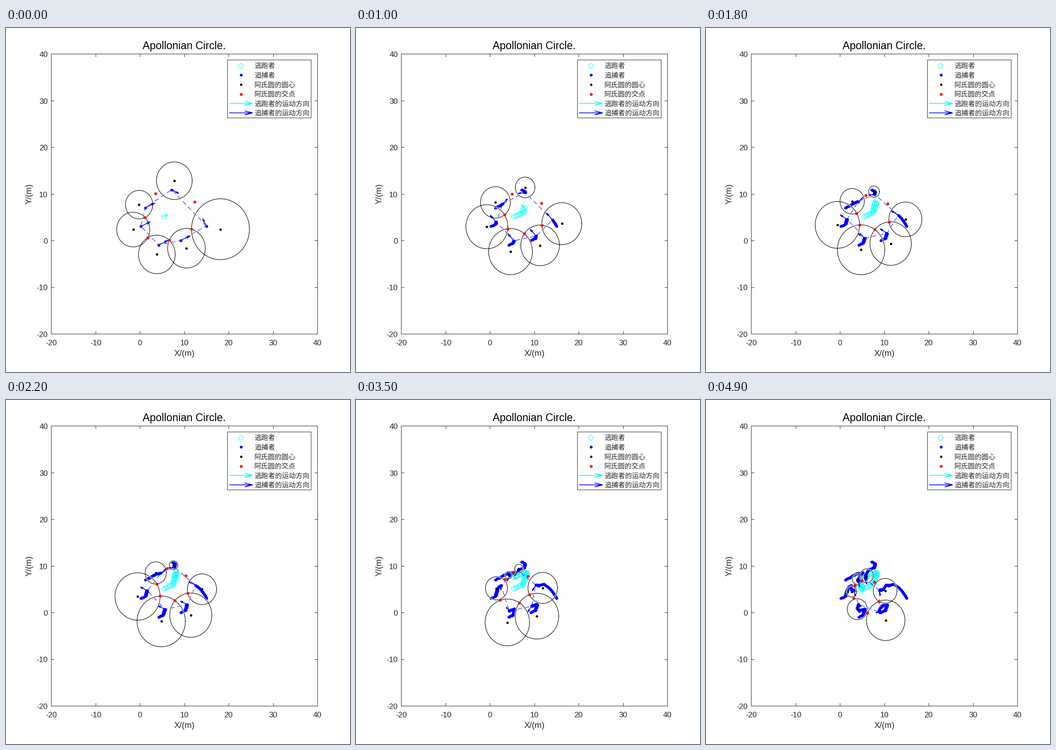
A matplotlib script for the animation above (5000 ms loop, 748 by 748 pixels).

```python
import numpy as np
import matplotlib.pyplot as plt
from matplotlib.animation import FuncAnimation
from matplotlib.patches import Rectangle

plt.rcParams["path.snap"] = False  # coordinates already sit on pixel centres

SIZE, DPI = 748, 64
PT = 72 / DPI                      # points per pixel
FRAMES, INTERVAL = 50, 100
EVADER_STEP, PURSUER_STEP = 0.4, 0.2
RATIO = PURSUER_STEP / EVADER_STEP
GUARD_PACE = 0.75                  # guards of the chosen gap move slower
INK = "#262626"
LEFT, RIGHT, TOP, BOTTOM = 98.5, 677.5, 56.5, 665.5

EVADER = np.array([5.0, 5.0])
PURSUERS = np.array([(15, 3), (7, 11), (1, 7), (0, 3), (4, -1), (9, 0)], float)


def length(v):
    return np.linalg.norm(v, axis=-1)


def plan(e, p):
    """Apollonian circles, their meeting points and the next moves."""
    centers = e + (p - e) / (1 - RATIO**2)
    radii = RATIO * length(p - e) / (1 - RATIO**2)
    next_radii = np.roll(radii, -1)
    span = np.roll(centers, -1, axis=0) - centers
    d = length(span)
    unit = span / d[:, None]
    along = (d**2 + radii**2 - next_radii**2) / (2 * d)
    apart = along**2 - radii**2    # positive where neighbours do not touch
    foot = centers + unit * along[:, None]
    side = np.column_stack([-unit[:, 1], unit[:, 0]])
    side *= np.sqrt(np.maximum(-apart, 0))[:, None]
    a, b = foot + side, foot - side
    meets = np.where((length(a - e) < length(b - e))[:, None], a, b)

    # Flee through the farthest gap; its two guards close in on it.
    reach = length(meets - e)
    gap = int(np.argmax(np.where(apart > 0, reach, -1)))
    heading = (meets[gap] - e) / reach[gap]
    moves = np.tile(heading, (len(p), 1))
    for i in (gap, (gap + 1) % len(p)):
        aim = meets[gap] - p[i]
        moves[i] = GUARD_PACE * aim / length(aim)
    return centers, radii, meets, heading, moves


def simulate():
    e, p = EVADER, PURSUERS
    states = []
    for _ in range(FRAMES):
        heading, moves = plan(e, p)[3:]
        e = e + EVADER_STEP * heading
        p = p + PURSUER_STEP * moves
        states.append((e, p, *plan(e, p)))
    return states


def to_px(points):
    points = np.asarray(points, float)
    x = LEFT + (points[..., 0] + 20) * (RIGHT - LEFT) / 60
    y = TOP + (40 - points[..., 1]) * (BOTTOM - TOP) / 60
    return np.stack([x, y], axis=-1)


def arrow_path(start, vec):
    tip = start + vec
    across = 0.25 * np.array([vec[1], -vec[0]])
    return np.array([start, tip, tip - 0.33 * (vec + across), tip,
                     tip - 0.33 * (vec - across), (np.nan, np.nan)])


def ring_path(center, radius):
    t = np.linspace(0, 2 * np.pi, 121)
    ring = center + radius * np.column_stack([np.cos(t), np.sin(t)])
    return np.vstack([ring, (np.nan, np.nan)])


fig = plt.figure(figsize=(SIZE / DPI, SIZE / DPI), dpi=DPI, facecolor="white")
ax = fig.add_axes([0, 0, 1, 1])
ax.set_xlim(0, SIZE)
ax.set_ylim(SIZE, 0)
ax.axis("off")


def label(x, y, text, px, ha="center", va="center", **kw):
    kw = {"family": "Liberation Sans", "color": INK, **kw}
    ax.text(x, y, text, fontsize=px * PT, ha=ha, va=va, **kw)


def stroke(color, width=1.0, z=3, xs=(), ys=(), **kw):
    return ax.plot(xs, ys, color=color, lw=width * PT, zorder=z,
                   solid_joinstyle="miter", **kw)[0]


def dots(color, px, z, xs=(), ys=()):
    return ax.plot(xs, ys, "o", color=color, ms=px * PT, mew=0, zorder=z)[0]


def open_dots(px, z, xs=(), ys=()):
    return ax.plot(xs, ys, "o", mfc="none", mec="cyan", ms=px * PT,
                   mew=PT, zorder=z)[0]


def frame_box(x0, y0, x1, y1, z, face="none"):
    ax.add_patch(Rectangle((x0, y0), x1 - x0, y1 - y0, fc=face, ec=INK,
                           lw=PT, zorder=z))


def draw_axes():
    frame_box(LEFT, TOP, RIGHT, BOTTOM, 2)
    for v in range(-20, 41, 10):
        x, y = np.floor(to_px((v, v))) + 0.5
        for edge, step in ((TOP, 6), (BOTTOM, -6)):
            stroke(INK, 1, 2, [x, x], [edge, edge + step])
        for edge, step in ((LEFT, 6), (RIGHT, -6)):
            stroke(INK, 1, 2, [edge, edge + step], [y, y])
        label(x - 0.5, 690, str(v), 16.7, va="baseline")
        label(91, y + 6, str(v), 16.7, ha="right", va="baseline")
    label(388, 713, "X/(m)", 18.3, va="baseline")
    label(51, 360.5, "Y/(m)", 18.3, rotation=90)
    label(387.5, 46, "Apollonian Circle.", 23.3, va="baseline", color="black")


def draw_legend():
    frame_box(481.5, 69.5, 663.5, 195.5, 10, "white")
    names = ("逃跑者", "追捕者", "阿氏圆的圆心", "阿氏圆的交点",
             "逃跑者的运动方向", "追捕者的运动方向")
    rows = 81.8 + 20.6 * np.arange(6)
    for y, name in zip(rows, names):
        label(540, y + 5.4, name, 15, ha="left", va="baseline",
              family="Noto Sans CJK JP", weight="light", zorder=11)
    open_dots(10, 11, [510.5], [rows[0]])
    for y, color, px in zip(rows[1:4], ("blue", "black", "red"), (6.2, 5.2, 6.2)):
        dots(color, px, 11, [510.8], [y])
    for y, color in zip(rows[4:], ("cyan", "blue")):
        path = arrow_path(np.array([486, y - 0.3]), np.array([50.0, 0]))
        stroke(color, 1.6, 11, *path.T)


draw_axes()
draw_legend()

evader_trail = open_dots(10, 3)
pursuer_trail = dots("blue", 6.2, 4)
hull = stroke("blue", 1, 4.2, dashes=(10, 6))
halos = stroke("white", 3, 4.4)
rings = stroke("black", 1.1, 4.6)
center_dots = dots("black", 5.2, 5)
meet_dots = dots("red", 6.2, 6)
evader_arrow = stroke("cyan", 1.5, 7)
pursuer_arrows = stroke("blue", 1.6, 7)

STATES = simulate()


def place(line, points):
    line.set_data(*to_px(points).T)


def update(k):
    e, p, centers, radii, meets, heading, moves = STATES[k]
    place(evader_trail, [s[0] for s in STATES[:k + 1]])
    place(pursuer_trail, np.vstack([s[1] for s in STATES[:k + 1]]))
    place(hull, np.vstack([p, p[:1]]))
    circles = np.vstack([ring_path(c, r) for c, r in zip(centers, radii)])
    place(halos, circles)
    place(rings, circles)
    place(center_dots, centers)
    place(meet_dots, meets)
    place(evader_arrow, arrow_path(e, 0.9 * heading))
    # Arrow length follows the spread of the pursuers.
    scale = 0.3 * length(np.ptp(p, axis=0)) / np.sqrt(len(p))
    place(pursuer_arrows,
          np.vstack([arrow_path(q, scale * m) for q, m in zip(p, moves)]))
    return ()


anim = FuncAnimation(fig, update, frames=FRAMES, interval=INTERVAL,
                     init_func=lambda: update(0), repeat=True, repeat_delay=0)
plt.show()
```
